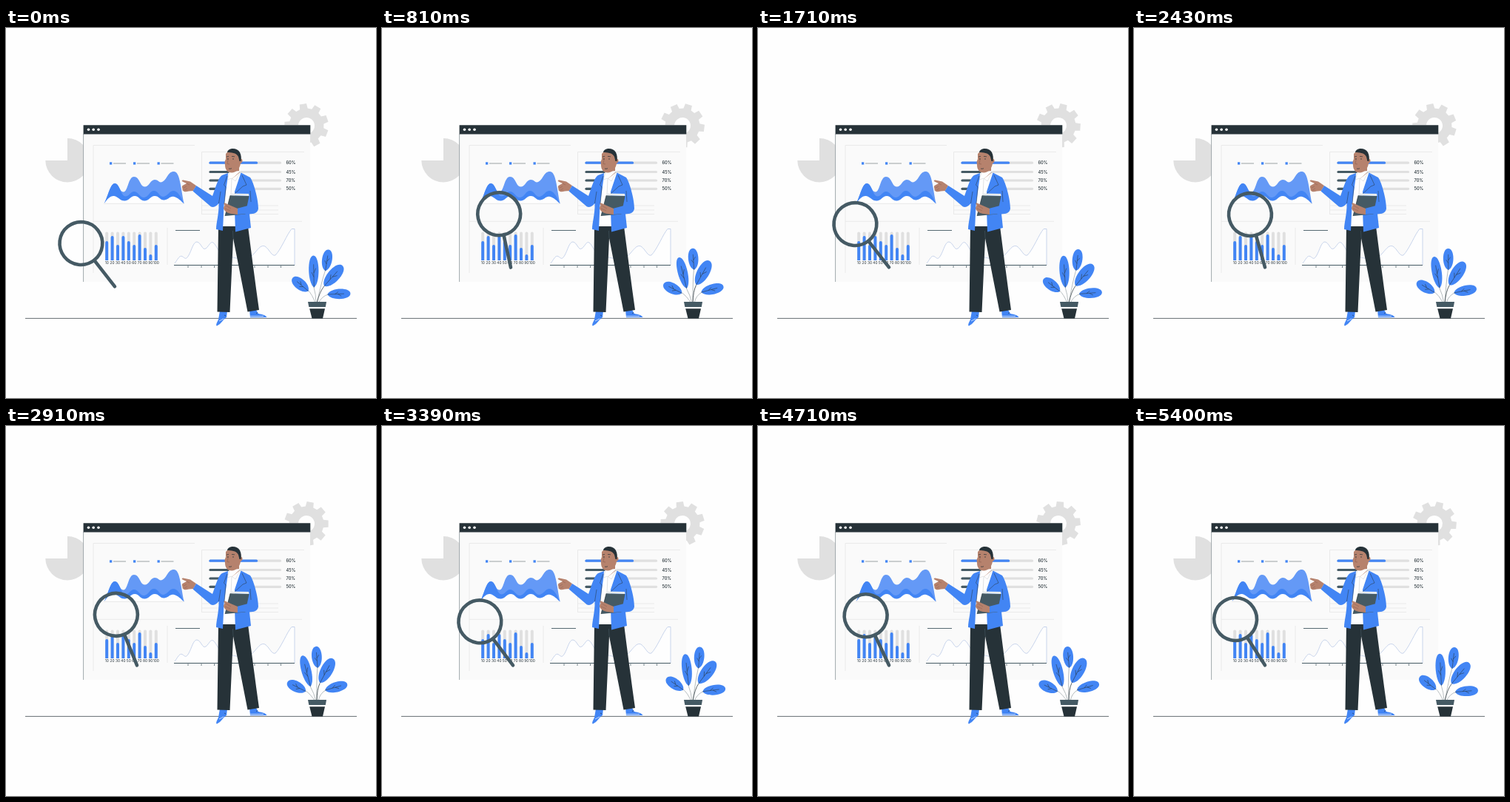
Recreate the animation shown at these times as an HTML page with a canvas. Size 500 px wide and 500 px high, loop 5430 ms.

```html
<!DOCTYPE html>
<html lang="en">
<head>
<meta charset="utf-8">
<title>Site statistics</title>
<style>
html, body { margin: 0; width: 100%; height: 100%; overflow: hidden; background: #fefefe; }
canvas { display: block; width: 500px; height: 500px; }
</style>
</head>
<body>
<canvas id="stage"></canvas>
<script>
const LOOP = 5430, STEP = 30;
const BLUE = '#4285f4', SKY = '#6499f6', DARK = '#263238', SLATE = '#455a64';
const GREY = '#e0e0e0', PALE = '#e6e6e6', SKIN = '#b6826d', WHITE = '#fefefe';

const canvas = document.getElementById('stage');
const ctx = canvas.getContext('2d');
const scale = window.devicePixelRatio || 1;
canvas.width = canvas.height = Math.round(500 * scale);

const rad = deg => deg * Math.PI / 180;

function fill(color, path) {
  ctx.fillStyle = color;
  ctx.fill(new Path2D(path), 'evenodd');
}

function stroke(color, width, path) {
  ctx.strokeStyle = color;
  ctx.lineWidth = width;
  ctx.stroke(new Path2D(path));
}

function disc(color, x, y, r) {
  ctx.fillStyle = color;
  ctx.beginPath();
  ctx.arc(x, y, r, 0, 7);
  ctx.fill();
}

function turned(x, y, deg, draw) {
  ctx.save();
  ctx.translate(x, y);
  ctx.rotate(rad(deg));
  draw();
  ctx.restore();
}

function label(text, x, y, size, weight, align) {
  ctx.font = `${weight} ${size}px Inter, "Open Sans", sans-serif`;
  ctx.textAlign = align;
  ctx.fillStyle = DARK;
  ctx.fillText(text, x, y);
}

// 1 at the peak, 0 after "down" ms, back to 1 at the end of the period
function swing(t, period, peak, down) {
  const p = ((t - peak) % period + period) % period;
  return p < down ? 1 - p / down : (p - down) / (period - down);
}

function gear(t) {
  const teeth = 9, pitch = 360 / teeth;
  turned(406, 132, -9 + pitch * t / 307, () => {
    ctx.beginPath();
    for (let i = 0; i < teeth; i++) {
      for (const [a, r] of [[-13, 23.5], [-9, 30], [9, 30], [13, 23.5]]) {
        const w = rad(i * pitch + a - 90);
        ctx.lineTo(r * Math.cos(w), r * Math.sin(w));
      }
    }
    ctx.closePath();
    ctx.moveTo(11, 0);
    ctx.arc(0, 0, 11, 0, Math.PI * 2);
    ctx.fillStyle = GREY;
    ctx.fill('evenodd');
  });
}

function browser() {
  fill('#fafafa', 'M104.5 131H411V343H104.5Z');
  stroke('#8b9499', 0.8, 'M104.6 143V343');
  fill(DARK, 'M104.6 131.2H411.3V143.4H104.6Z');
  for (const x of [111.5, 118.2, 125]) disc(WHITE, x, 137.2, 1.8);
  stroke(PALE, 0.8, 'M118 331V158.5H255 M264.5 252V167.5H403 M118 261.3H400 M218 270V320');
  stroke(PALE, 0.8, 'M264.5 240H368 M264.5 246H368 M264.5 251.5H368');
}

function waves() {
  for (const x of [140, 172, 204.5]) {
    fill(BLUE, `M${x} 181.3h3.3v3.3h-3.3Z`);
    stroke('#a5abae', 1.1, `M${x + 5} 183h17`);
  }
  fill(SKY, 'M133 236.5C138 227 141 210 147 210C153 210 153 222 159 221.5C165 221 165 201 173 201' +
    'C181 201 181 215 188 214.5C194 214 195 205 201 205C206 205 207 210 211 208C218 205 218 194 227 194' +
    'C235 194 236 215 240.5 237Z');
  fill(BLUE, 'M133 236.5C138 227 141 210 147 210C154 210 155 228 162 227.5C167 227 168 221 173 221' +
    'C179 221 181 230 187 229C193 228 194 220 200 220C206 220 207 228.5 213 228C219 227 220 220 227 220' +
    'C233 221 237 230 240.5 237Z');
  fill(WHITE, 'M132 238C137 231 141 226.5 146 227C152 228 154 234 161 233.5C167 233 168 227 174 227' +
    'C180 227 181 234 188 233.5C194 233 195 227 201 227C207 227 208 233 214 232.5C220 232 221 227 227 228' +
    'C232 229 237 234 241 238Z');
  stroke(GREY, 0.7, 'M132 237.3H241');
}

function progress() {
  ctx.lineCap = 'round';
  [[182.2, 338.5, '60%', BLUE], [194.5, 314, '45%', SLATE],
   [206, 322, '70%', SLATE], [217.3, 316, '50%', SLATE]].forEach(([y, end, text, color]) => {
    stroke(GREY, 3.2, `M276 ${y}H370.5`);
    stroke(color, 3.2, `M276 ${y}H${end}`);
    label(text, 378.5, y + 2, 5.7, 500, 'left');
  });
  ctx.lineCap = 'butt';
}

function bars() {
  const tops = [288, 281, 293, 281, 288, 293, 279, 297, 306, 293];
  const bar = (x, top) => `M${x - 2} 314V${top + 2}a2 2 0 0 1 4 0V314Z`;
  tops.forEach((top, i) => {
    const x = 136.2 + 7.4 * i;
    fill(GREY, bar(x, 275.5));
    fill(BLUE, bar(x, top));
    label(10 * (i + 1), x, 319.3, 4.9, 400, 'center');
  });
}

function lineChart() {
  const curve = 'M228 318C232 313 234 307 238 308.5C242 311 243 314 247 307C251 300 253 289 258 289' +
    'C264 290 265 301 270 298C275 294 276 288 280 290C285 294 288 306 294 307C310 310 325 318 336 304' +
    'C342 297 345 293 350 295C356 299 359 309 364 307C372 299 380 278 386 271.5L390 271.5V320';
  stroke(SLATE, 0.9, 'M229 273.5H262');
  fill(WHITE, curve + 'H228Z');
  stroke('#bccbe8', 0.8, curve);
  stroke(SLATE, 1, 'M227 320.5H390');
  for (const x of [246, 264, 281.5, 300, 318, 336, 354, 371.5]) stroke(SLATE, 0.9, `M${x} 321.5v2.3`);
}

function man() {
  // shoes and trousers
  fill(BLUE, 'M289 382H299L298 391C294 393 291 400 285 402.5C283 402 285 398 287 394Z');
  fill(BLUE, 'M329 381H338L341 386C346 387 351 388 352.5 391H330Z');
  stroke(WHITE, 0.7, 'M330 389.5H348 M288 396L294 393');
  stroke(DARK, 0.6, 'M295 388l2 1 M338 386l2 -1.5');
  fill(DARK, 'M287 268H327C331 300 337 345 342 381L326.5 383.5L307 284L302.5 384L285.5 383.5Z');
  stroke(SLATE, 0.6, 'M307 284L306.5 274');

  // shirt and neck
  fill(WHITE, 'M294 199L314 195L322 210L312 266L293 267Z');
  fill(SKIN, 'M302 189L315 186L315 196L305 204L302 199Z');
  stroke('#c9cdd0', 0.6, 'M305 204L304 226');
  fill(WHITE, 'M302 194L298.5 204L305 204L314.5 195.5L317 193Z');
  stroke('#c9cdd0', 0.5, 'M302 195L299 205L305 203L310 207L316 195');

  // pointing hand
  fill(SKIN, 'M257 213L249 207.5L239.5 205.5C237.5 205.3 237 207 239 207.7L244 210L238.5 213' +
    'C237 215 239 217 238.5 219C240 222 244 221.5 247 220.5L253 220Z');
  stroke('#8d5f50', 0.5, 'M244 210L248 212 M240 216l4 -2 M241 219l4 -2');

  // jacket
  fill(BLUE, 'M300 196L292 199C287 202 284 213 279 227L257 213L252.5 220.5L277 241.5C282 243 285 240 287.5 237' +
    'C288 251 284 263 284 272L293 274L294.5 240L299.5 203Z');
  fill(BLUE, 'M317.5 195.5L330 202C335 209 341 232 341 244C340 251 334 251 329 251.5L331 270L310 275.5L309 246L309 221Z');
  stroke(DARK, 0.5, 'M299 200L294.5 212L297 215L295 238 M319 199L325 212L320 214L309 224 M287.5 237L290 221 M330 220L331 235');

  // folder and holding hand
  fill(SLATE, 'M303 226L328.5 227L323.5 251.5L296 254Z');
  fill('#e8ecee', 'M304 223.5L328 224L328.5 227L303 226.3Z');
  stroke(DARK, 0.6, 'M303 226.5L296 254');
  fill(BLUE, 'M340 241C340 250 335 251 328 251L312 252L312 244L327 240Z');
  fill(SKIN, 'M313 244L306 241L296 236.5C294 236 294 238 295.5 239L294 243C294 247 299 250 304 251L313 252Z');
  stroke('#8d5f50', 0.5, 'M297 240L304 244 M296 244L303 247');

  // head
  fill(SKIN, 'M297 170C301 165 312 164 317 172L317.5 177C320 176 320.5 182 317 183C316 190 311 195.5 305 195.5' +
    'C299 195.5 296 191 296 185L295.5 181L297 177Z');
  fill(DARK, 'M299 168C300 162 312 161 316 168C318 172 318 176 317.5 180L315.5 180L314 174C311 168 304 168.5 299 168Z');
  stroke(DARK, 0.7, 'M298 174l3 -.5 M305 173.5l4 .3 M301 190q2 .8 4 -.3');
  stroke('#8d5f50', 0.6, 'M300.5 176L299 183.5L302 184 M317 178l1.5 2');
  disc(DARK, 299.8, 177, 0.7);
  disc(DARK, 307, 177, 0.7);
}

function leaf(x, y, length, width, tilt) {
  turned(x, y, tilt, () => {
    const l = length, w = width * 1.38;
    fill(BLUE, `M0 ${l}C${-w} ${l * 0.75} ${-w} ${-l} 0 ${-l}C${w} ${-l} ${w} ${l * 0.75} 0 ${l}Z`);
    stroke(DARK, 0.5, `M0 ${l}L0 ${-l * 0.45}M0 ${l * 0.35}L${-width * 0.45} ${l * 0.05}` +
      `M0 ${l * 0.1}L${width * 0.45} ${-l * 0.2}`);
  });
}

function plant(t) {
  const angle = 0.5 - 16 * (1 - swing(t, 1840, 40, 920));
  turned(420, 372, angle, () => {
    ctx.translate(-420, -372);
    stroke('#a9b1b4', 0.8, 'M419 372Q419 360 416 350 M420 372Q426 345 431.5 328 ' +
      'M418 372Q414 360 408 354 M422 372Q427 362 436 360');
    stroke(DARK, 0.7, 'M420 372Q424 356 430 349');
    leaf(434, 314, 14.5, 6.6, 9);
    leaf(416, 329, 21.5, 6.4, -1);
    leaf(442.5, 335, 18.5, 8, 42);
    leaf(398, 346.5, 13.8, 7, -50);
    leaf(450, 359.5, 15.5, 6.6, 88);
  });
  fill(SLATE, 'M408 370H433L431.8 377H409.3Z');
  fill(WHITE, 'M409.5 377H431.7L431 379.5H410Z');
  fill(DARK, 'M410.2 379.3H431L428 392.5H413.5Z');
}

function magnifier(t) {
  const k = Math.max(0, 1 - t / 900);
  const angle = 11.2 + 29 * swing(t, 1710, 70, 770);
  turned(177 - 30 * k, 323.3 + 26 * k * k, -angle, () => {
    ctx.lineCap = 'round';
    stroke(SLATE, 4.6, 'M0 -45V0');
    ctx.lineCap = 'butt';
    ctx.beginPath();
    ctx.arc(0, -74, 28.9, 0, 7);
    ctx.lineWidth = 4.6;
    ctx.stroke();
  });
}

function draw(t) {
  ctx.setTransform(scale, 0, 0, scale, 0, 0);
  ctx.fillStyle = WHITE;
  ctx.fillRect(0, 0, 500, 500);
  fill(GREY, 'M83 179V149A29.7 29.7 0 1 1 53.3 179Z');
  gear(t);
  browser();
  waves();
  progress();
  bars();
  lineChart();
  stroke(DARK, 0.7, 'M26 392.4H474');
  man();
  plant(t);
  magnifier(t);
}

const start = performance.now();
function tick() {
  const t = (performance.now() - start) % LOOP;
  draw(Math.floor(t / STEP) * STEP);
  requestAnimationFrame(tick);
}
tick();
</script>
</body>
</html>
```
